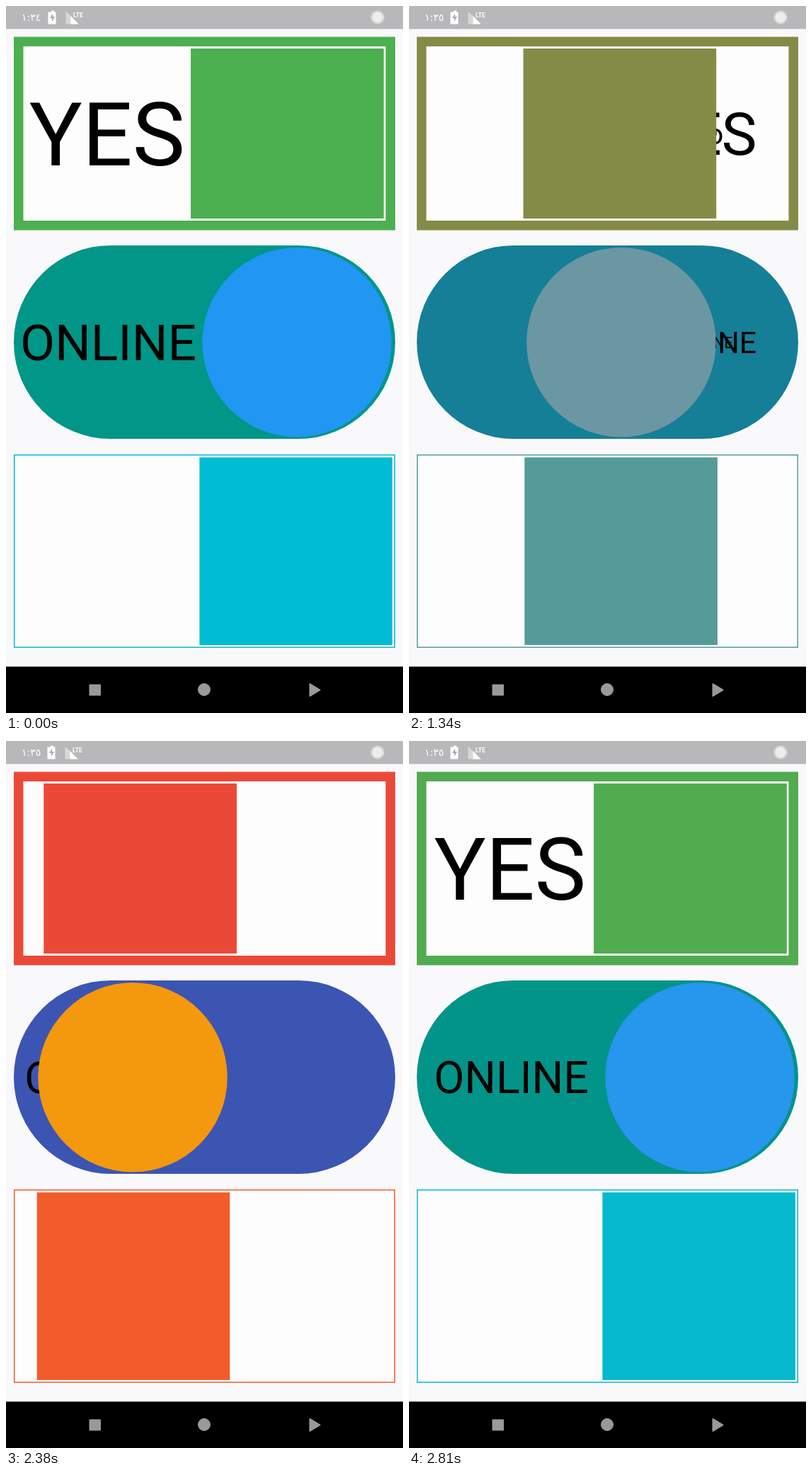
An HTML page that plays this animation: 561x998 px, repeating every 3.34 s.

```html
<!DOCTYPE html>
<html lang="en">
<head>
<meta charset="utf-8">
<title>Toggle switches</title>
<style>
  html, body { margin: 0; width: 100%; height: 100%; overflow: hidden; background: #f9f9fc; }
  svg { display: block; width: 100vw; height: 100vh; }
  .label { font-family: Roboto, sans-serif; text-anchor: middle; fill: #000; }
  .clock { font: 14px "DejaVu Sans", sans-serif; direction: ltr; unicode-bidi: bidi-override; }
  .lte { font: bold 8.5px Roboto, sans-serif; }
</style>
</head>
<body>
<svg id="stage" viewBox="0 0 561 998" xmlns="http://www.w3.org/2000/svg">
  <rect width="561" height="998" fill="#f9f9fc"/>

  <g id="switches"></g>

  <rect width="561" height="32.5" fill="#b8b7b9"/>
  <g fill="#fff">
    <text id="clock" class="clock" x="22" y="21"></text>
    <g id="icons">
      <path d="M62 8.5h2v-2h4v2h2.500v17h-11v-17z" transform="translate(-1)"/>
      <path d="M65 10.500l-4 6.500h3v5l4-7h-3z" fill="#aaa9ad"/>
      <path d="M83.500 7.500v18h18z" opacity=".45"/>
      <path d="M90.500 14v11.500h11z"/>
      <text class="lte" x="94" y="15.500">LTE</text>
    </g>
    <circle cx="525" cy="16" r="7.500" opacity=".75"/>
    <circle cx="525" cy="16" r="8.500" fill="none" stroke="#fff" stroke-width="2" stroke-dasharray="1.5 1.2" opacity=".8"/>
  </g>

  <rect y="932.5" width="561" height="65.500" fill="#000"/>
  <g fill="#999" stroke="#999" stroke-linejoin="round">
    <rect x="118" y="958" width="15.500" height="15" stroke-width="1"/>
    <circle cx="280" cy="965" r="8.500" stroke-width="1"/>
    <path d="M429.500 957v17l14-8.500z" stroke-width="2"/>
  </g>
</svg>
<script>
const LOOP = 3340;
const TAP_OFF = 1092, TAP_ON = 2262;
const LAST_MOVE = 2810;
const CLOCK_TICK = 590;
const MOVE_MS = 550, FADE_DELAY = 95, FADE_MS = 465;

const clamp = v => Math.max(0, Math.min(1, v));
const mix = (a, b, k) => a + (b - a) * k;
const mixColor = ([a, b], k) => `rgb(${a.map((v, i) => Math.round(mix(v, b[i], k)))})`;

// Colours, labels and positions are [off, on] pairs.
const GREEN = [[244, 67, 54], [76, 175, 80]];
const CYAN = [[255, 87, 34], [0, 188, 212]];
const switches = [
  { frame: { y: 43.5, height: 273 }, frameColor: GREEN,
    inner: { x: 24.5, y: 57, width: 512, height: 246 },
    thumb: { y: 60, width: 272.7, height: 240 }, thumbColor: GREEN, thumbX: [27.3, 261.1],
    labels: ["No", "YES"], labelX: [417.8, 142.8], size: 125, firstSize: 125, middle: 180.5 },
  { frame: { y: 338, height: 273, rx: 136.5 }, frameColor: [[63, 81, 181], [0, 150, 136]],
    thumb: { y: 341, width: 267.5, height: 267.5, rx: 133.75 },
    thumbColor: [[255, 152, 0], [33, 150, 243]], thumbX: [16.3, 277.4],
    labels: ["OFFLINE", "ONLINE"], labelX: [416.3, 144.5], size: 64.2, firstSize: 71.3, middle: 475 },
  { frame: { y: 633, height: 273 }, frameColor: CYAN,
    inner: { x: 12.5, y: 634.5, width: 536, height: 270 },
    thumb: { y: 637.2, width: 272.6, height: 264.8 }, thumbColor: CYAN, thumbX: [15, 273.4],
    labels: [] }
];

function set(node, attrs) {
  for (const name in attrs) node.setAttribute(name, attrs[name]);
}

function add(parent, tag, attrs) {
  const node = document.createElementNS("http://www.w3.org/2000/svg", tag);
  set(node, attrs);
  return parent.appendChild(node);
}

const group = document.getElementById("switches");
for (const s of switches) {
  s.frameNode = add(group, "rect", { x: 11, width: 539, ...s.frame });
  if (s.inner) add(group, "rect", { fill: "#fdfdfd", ...s.inner });
  s.labelNodes = s.labels.map(text => {
    const node = add(group, "text", { class: "label" });
    node.textContent = text;
    return node;
  });
  s.thumbNode = add(group, "rect", s.thumb);
}

const clock = document.getElementById("clock");
const icons = document.getElementById("icons");

function pose(t) {
  if (t < TAP_OFF) return { on: 1, move: 1, fade: 1, first: true };
  const on = t < TAP_ON ? 0 : 1;
  const elapsed = Math.min(t, LAST_MOVE) - (on ? TAP_ON : TAP_OFF);
  const move = (1 - Math.cos(Math.PI * clamp(elapsed / MOVE_MS))) / 2;
  const fade = clamp((elapsed - FADE_DELAY) / FADE_MS);
  return on ? { on, move, fade } : { on, move: 1 - move, fade: 1 - fade };
}

function render(t) {
  const { on, move, fade, first } = pose(t);
  for (const s of switches) {
    set(s.frameNode, { fill: mixColor(s.frameColor, fade) });
    set(s.thumbNode, { x: mix(...s.thumbX, move), fill: mixColor(s.thumbColor, fade) });
    s.labelNodes.forEach((node, i) => {
      const scale = i ? fade : 1 - fade;
      const size = (first ? s.firstSize : s.size) * scale;
      set(node, {
        x: s.labelX[on],
        y: s.middle + size * 0.356,
        "font-size": size,
        visibility: scale > 0.03 ? "visible" : "hidden"
      });
    });
  }
  const ticked = t >= CLOCK_TICK;
  clock.textContent = ticked ? "١:٣٥" : "١:٣٤";
  set(icons, { transform: `translate(${ticked ? 0 : 1})` });
}

const start = performance.now();
function tick() {
  render((performance.now() - start) % LOOP);
  requestAnimationFrame(tick);
}
tick();
</script>
</body>
</html>
```
